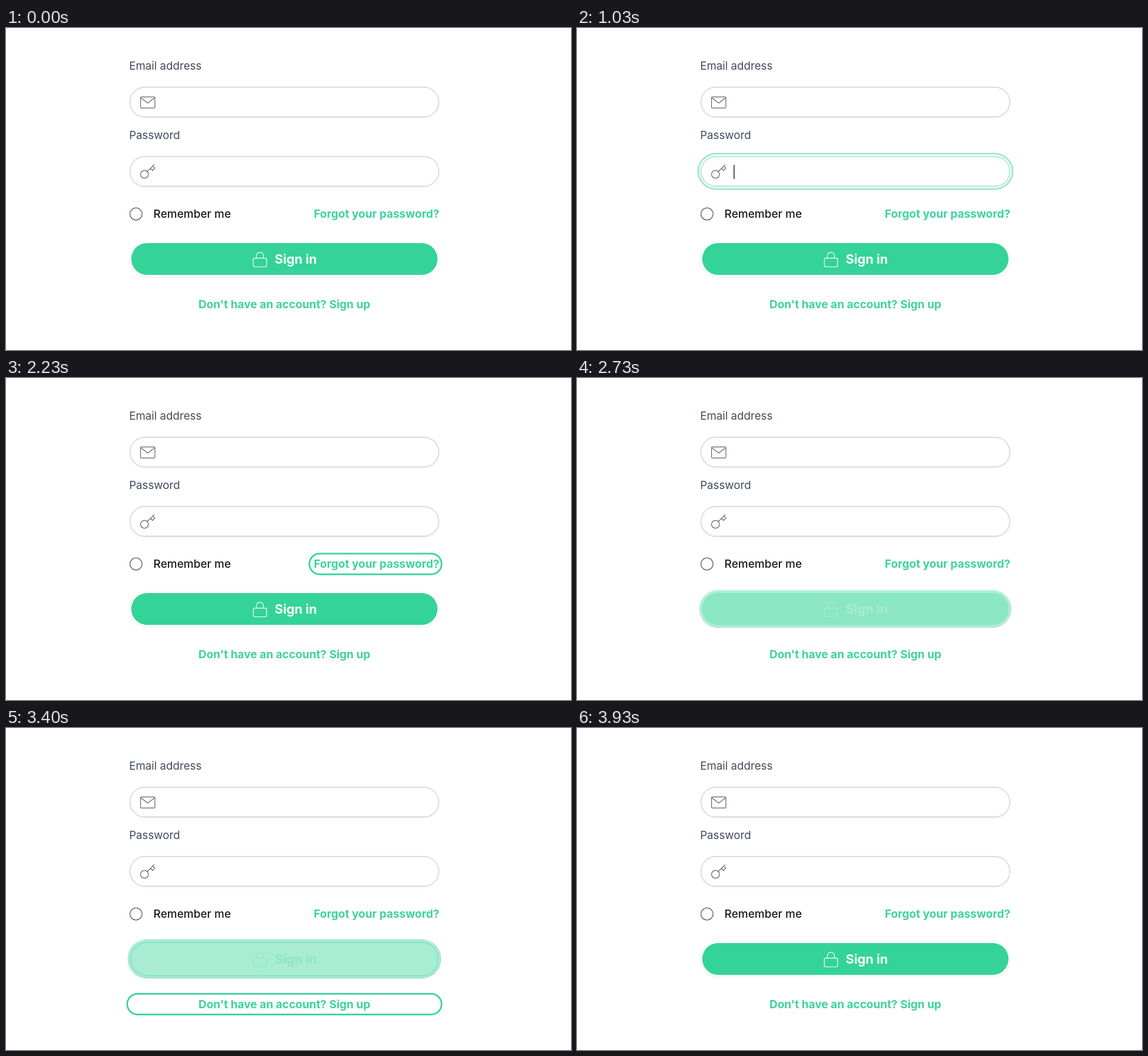
An HTML page that plays this animation: 960x548 px, repeating every 4960 ms.

```html
<!DOCTYPE html>
<html lang="en">
<head>
<meta charset="utf-8">
<title>Sign-in form focus order</title>
<style>
  html, body { margin: 0; width: 100%; height: 100%; overflow: hidden; background: #fff; }
  svg { display: block; width: 100%; height: 100%; }
  text { font: 19px Inter, sans-serif; font-optical-sizing: none; }
  .label { font-size: 18.7px; fill: #414b5a; }
  .link { font-weight: 700; fill: #3dd39d; }
  .shadow { filter: drop-shadow(0 1.4px 1.4px rgba(0, 0, 0, .08)); }
  .field { fill: #fff; stroke-width: 1.36; }
  .icon { fill: none; stroke: #5f6369; stroke-width: 1.2; stroke-linejoin: round; }
  .caret { fill: #111827; }
</style>
</head>
<body>
<svg viewBox="0 0 960 548">
  <g id="rings"></g>

  <text class="label" x="209.2" y="71.3">Email address</text>
  <rect id="email" class="field shadow" x="210.7" y="100.7" width="524.6" height="50.6" rx="25.3"/>
  <g class="icon">
    <rect x="228.6" y="117.3" width="24.4" height="18.9" rx="1.5"/>
    <path d="M229 118.7L240.8 127.7L252.6 118.7"/>
  </g>
  <rect id="emailCaret" class="caret" x="266.2" y="115" width="1.4" height="24"/>

  <text class="label" x="209.2" y="189.3">Password</text>
  <rect id="password" class="field shadow" x="210.7" y="218.7" width="524.6" height="50.6" rx="25.3"/>
  <g class="icon">
    <circle cx="235.3" cy="249" r="6.7"/>
    <path d="M240.1 244.2L252 232.4M249.3 235.1L253 238.4L249 242.5L245.4 239"/>
  </g>
  <rect id="passwordCaret" class="caret" x="266.2" y="233" width="1.4" height="24"/>

  <circle cx="220.9" cy="316.5" r="10.3" fill="#fff" stroke="#5f6369" stroke-width="1.3"/>
  <text x="250.6" y="323.3" style="font-weight:500;fill:#161a20">Remember me</text>
  <text class="link" x="736.4" y="323.3" text-anchor="end">Forgot your password?</text>

  <rect id="buttonEdge" class="shadow" x="210" y="363" width="526" height="60" rx="30"/>
  <rect id="buttonFace" x="212.8" y="365.9" width="520.4" height="54.3" rx="27.1"/>
  <g class="icon" id="lock">
    <rect x="420.2" y="391.6" width="22.6" height="14.9" rx="2.7"/>
    <path d="M425.4 391.6v-4a6 6 0 0 1 12 0v4"/>
  </g>
  <text id="buttonText" x="456.5" y="401.3" style="font-size:21.7px;font-weight:700">Sign in</text>

  <text class="link" x="473" y="476.7" text-anchor="middle">Don't have an account? Sign up</text>
</svg>
<script>
const LOOP = 4960, FADE = 250, STEP = 33.4, UNIT = 2.71;
const GREEN = [52, 211, 153], WHITE = [255, 255, 255];
const $ = id => document.getElementById(id);

// x, y, width, height, opacity, focus [start, end], blur [start, end]
const rings = {
  email:    makeRing(210, 100, 526, 52, .5, [70, 330], [770, 1030]),
  password: makeRing(210, 218, 526, 52, .5, [770, 1030], [1430, 1630]),
  remember: makeRing(210, 305.6, 21.8, 21.8, .5, [1430, 1630], [2070, 2230]),
  forgot:   makeRing(519.5, 303, 216.5, 27, 1, [2070], [2730]),
  button:   makeRing(210, 363, 526, 60, 1, [2730, 2900], [3400, 3570]),
  signUp:   makeRing(210, 456.5, 526, 27, 1, [3400], [3930]),
};

function makeRing(x, y, w, h, alpha, focus, blur) {
  const layers = ['#34d399', '#fff'].map(fill => {
    const rect = document.createElementNS($('rings').namespaceURI, 'rect');
    rect.setAttribute('fill', fill);
    return $('rings').appendChild(rect);
  });
  return { x, y, w, h, alpha, focus, blur, layers };
}

// cubic-bezier(.4, 0, .2, 1), solved by bisection
function ease(x) {
  if (x <= 0 || x >= 1) return x <= 0 ? 0 : 1;
  let low = 0, high = 1, s = .5;
  for (let i = 0; i < 18; i++) {
    const at = 1.2 * s * (1 - s) ** 2 + .6 * s * s * (1 - s) + s ** 3;
    if (at < x) low = s; else high = s;
    s = (low + high) / 2;
  }
  return s * s * (3 - 2 * s);
}

// A span shorter than the fade shows only the fade's last part.
function progress(t, [start, end]) {
  if (t < start) return 0;
  if (end === undefined || t >= end) return 1;
  const held = Math.floor((t - start) / STEP) * STEP;
  return ease((held + FADE - (end - start)) / FADE);
}

const focusAmount = (ring, t) => progress(t, ring.focus) - progress(t, ring.blur);

function drawRing({ x, y, w, h, alpha, layers }, amount) {
  layers.forEach((rect, i) => {
    const grow = UNIT * (2 - i) * amount;
    const box = {
      x: x - grow, y: y - grow, width: w + 2 * grow, height: h + 2 * grow,
      rx: h / 2 + grow, opacity: amount * (i ? 1 : alpha),
    };
    for (const key in box) rect.setAttribute(key, box[key]);
  });
}

const mix = (a, b, p) => `rgb(${a.map((v, i) => v + (b[i] - v) * p)})`;

function draw(t) {
  for (const ring of Object.values(rings)) drawRing(ring, focusAmount(ring, t));

  for (const id of ['email', 'password']) {
    const start = rings[id].focus[0], end = rings[id].blur[0];
    const focused = t >= start && t < end;
    const caretEnd = id === 'email' ? 530 : 1270;
    $(id).style.stroke = focused ? '#9ae3c8' : '#d1d3d6';
    $(id + 'Caret').style.opacity = focused && t < caretEnd ? 1 : 0;
  }

  const p = focusAmount(rings.button, t);
  const ink = mix(WHITE, GREEN, p);
  $('buttonEdge').style.fill = $('lock').style.stroke = $('buttonText').style.fill = ink;
  $('buttonFace').style.fill = mix(GREEN, WHITE, p);
}

const began = performance.now();
function tick() {
  draw((performance.now() - began) % LOOP);
  requestAnimationFrame(tick);
}
tick();
</script>
</body>
</html>
```
